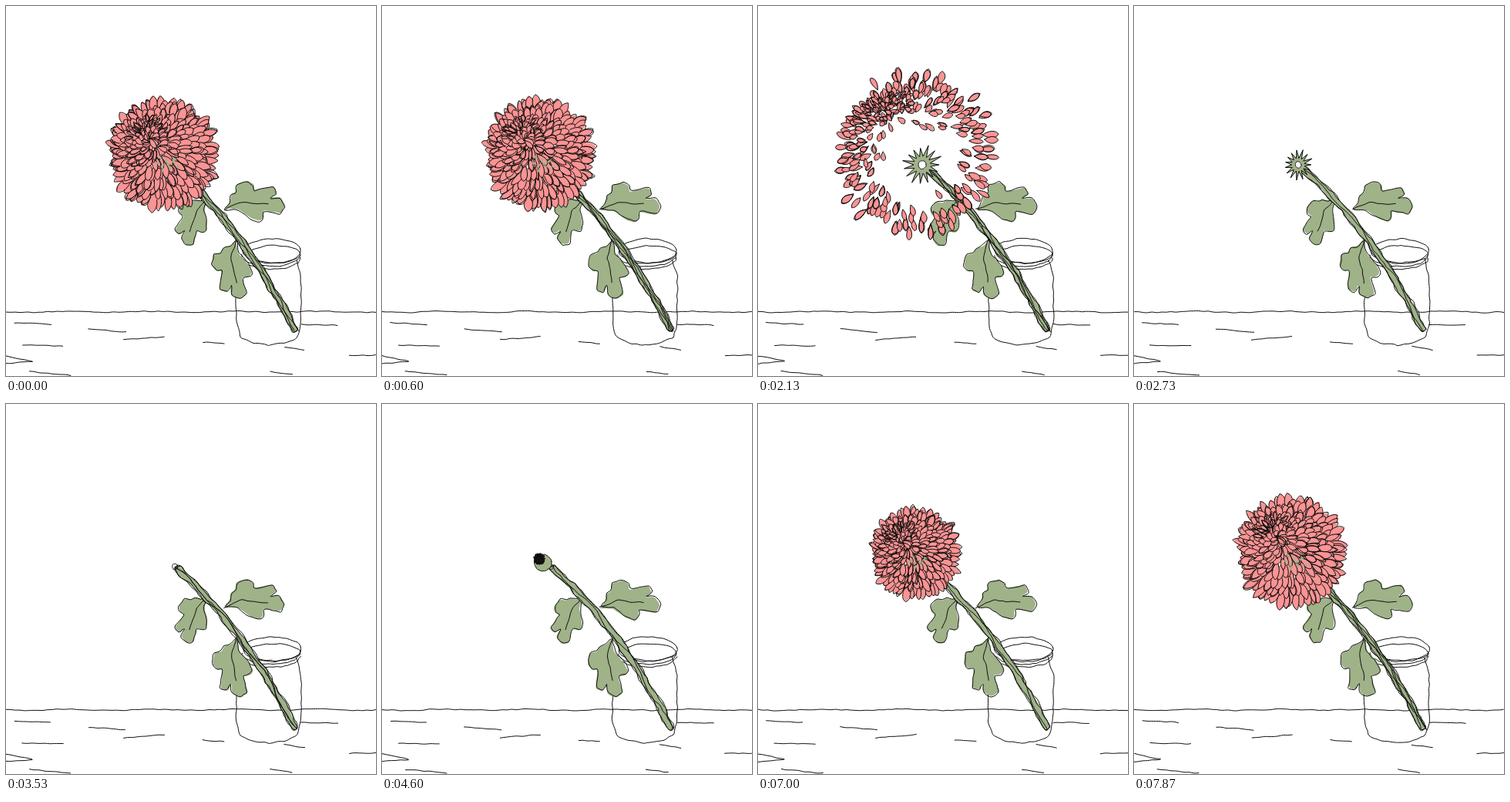
Animation of 480 by 480 pixels, one loop 7940 ms. Source, as an HTML page with a canvas:

```html
<!DOCTYPE html>
<html lang="en">
<head>
<meta charset="utf-8">
<title>Flower in a jar</title>
<style>
html, body { margin: 0; width: 100%; height: 100%; overflow: hidden; background: #fff; }
canvas { display: block; }
</style>
</head>
<body>
<canvas id="stage" width="480" height="480"></canvas>
<script>
const ctx = document.getElementById('stage').getContext('2d');
const LOOP = 7940, FRAMES = 119;
const GREEN = '#9fb288', PINK = '#fb9494', INK = '#0c0c0c';
const TAU = Math.PI * 2;
const BURST = 1450, BURST_LENGTH = 1150;
const HEART = { x: 207, y: 205 };

function seeded(seed) {
  let a = seed * 7919 + 17;
  return () => {
    a = (a + 0x6d2b79f5) | 0;
    let x = Math.imul(a ^ (a >>> 15), 1 | a);
    x = (x + Math.imul(x ^ (x >>> 7), 61 | x)) ^ x;
    return ((x ^ (x >>> 14)) >>> 0) / 4294967296;
  };
}

let rand = seeded(1);
const spread = amount => (rand() * 2 - 1) * amount;
const clamp = x => Math.min(1, Math.max(0, x));
const progress = (t, from, to) => clamp((t - from) / (to - from));
const smooth = x => x * x * (3 - 2 * x);
const range = (n, make) => Array.from({ length: n }, (_, i) => make(i));
const points = text => text.split(' ').map(p => p.split(',').map(Number));

// One lobed leaf, measured along and across its axis.
const leafShape = points('0,0 .1,.11 .12,.24 .2,.27 .21,.4 .4,.45 .5,.38 .49,.29 .82,.35 .87,.23 .75,.16 .92,.17 1,.03 .93,-.1 .64,-.04 .64,-.17 .58,-.22 .44,-.17 .22,-.01');
const veinShape = points('0,0 .3,.12 .5,.08 .72,.07');
const leaves = [placeLeaf(283, 264, 362, 262, 1), placeLeaf(262, 250, 235, 311, -1), placeLeaf(299, 303, 306, 380, -1)];

function placeLeaf(x, y, tipX, tipY, side) {
  const dx = tipX - x, dy = tipY - y;
  const place = ([u, v]) => [x + dx * u + dy * v * side, y + dy * u - dx * v * side];
  return { outline: leafShape.map(place), vein: veinShape.map(place) };
}

const stem = range(20, i => {
  const t = i / 19, bend = 2 * t * (1 - t), rest = (1 - t) * (1 - t);
  return [219 * rest + 306 * bend + 376 * t * t, 211 * rest + 285 * bend + 422 * t * t];
});

const jarSide = points('36,329 42,352 42,412 37,430 21,437 0,440');
const jar = [...jarSide.map(([x, y]) => [341 + x, y]), ...jarSide.map(([x, y]) => [341 - x, y]).reverse()];

const scratches = [
  '11,411 58,413', '21,440 74,441', '107,419 155,423', '153,433 205,429', '255,436 283,438', '30,474 84,479',
  '343,474 371,478', '361,442 387,446', '445,453 480,453', '383,413 430,414', '0,454 36,461 0,464'
].map(points);

const petals = makePetals();

function makePetals() {
  rand = seeded(5);
  const list = [], rings = 7;
  const add = (cx, cy, r, angle, length, width) => {
    const mid = r - length / 2;
    list.push({
      x: cx + Math.cos(angle) * mid, y: cy + Math.sin(angle) * mid,
      angle: angle + spread(.22), length, width, pace: 1 + spread(.24)
    });
  };
  for (let ring = 0; ring < rings; ring++) {
    const f = ring / (rings - 1), count = Math.round(56 - 42 * f);
    for (let i = 0; i < count; i++) {
      const angle = (i + ring / 2 + rand() * .7) / count * TAU;
      add(205 - 17 * f, 192.5 - 18 * f, (74 - 62 * f) * (.92 + rand() * .15), angle,
        28 - 15 * f + spread(3), 10 - 3.5 * f + spread(1.5));
    }
    if (ring === rings - 3) {
      range(50, () => add(182, 169, 15 + rand() * 14, Math.PI * (.95 + rand() * 1.1), 11, 4));
    }
  }
  return list;
}

// Splits long segments so that every stretch of a line can wobble.
function divide(path, closed, step = 6) {
  const out = [];
  const last = closed ? path.length : path.length - 1;
  for (let i = 0; i < last; i++) {
    const [x, y] = path[i], [u, v] = path[(i + 1) % path.length];
    const n = Math.max(1, Math.round(Math.hypot(u - x, v - y) / step));
    for (let k = 0; k < n; k++) out.push([x + (u - x) * k / n, y + (v - y) * k / n]);
  }
  if (!closed) out.push(path[last]);
  return out;
}

function trace(path, closed, wobble) {
  const p = divide(path, closed).map(([x, y]) => [x + spread(wobble), y + spread(wobble)]);
  const n = p.length;
  const middle = i => [(p[i][0] + p[(i + 1) % n][0]) / 2, (p[i][1] + p[(i + 1) % n][1]) / 2];
  ctx.beginPath();
  if (closed) ctx.moveTo(...middle(n - 1));
  else ctx.moveTo(...p[0]);
  for (let i = closed ? 0 : 1; i < (closed ? n : n - 1); i++) ctx.quadraticCurveTo(...p[i], ...middle(i));
  if (!closed) ctx.lineTo(...p[n - 1]);
}

function sketch(path, closed = false, wobble = 1) {
  trace(path, closed, wobble);
  ctx.stroke();
}

function paint(path, color) {
  trace(path, true, .3);
  ctx.fillStyle = color;
  ctx.fill();
}

function ellipse(x, y, rx, ry, share = 1) {
  return range(24, i => {
    const a = TAU * share * i / (share < 1 ? 23 : 24);
    return [x + Math.cos(a) * rx, y + Math.sin(a) * ry];
  });
}

function drawTable() {
  sketch(range(41, i => [i * 12, 396.7 + Math.sin(i * .7) * .8]), false, .8);
  scratches.forEach(line => sketch(line, false, .7));
}

function drawJar() {
  sketch(jar.slice(0, -1), false, 1.1);
  sketch(ellipse(345, 318, 38, 16), true, 1.1);
  sketch(ellipse(347, 322, 35, 11), true, 1.1);
  for (const y of [323, 327]) sketch(ellipse(344, y, 38, 14.5, .5));
}

function drawStem() {
  const edge = side => stem.map(([x, y], i) => {
    const half = (4.2 + Math.sin(i * 1.9 + side)) * side;
    return [x + half * .85, y - half * .53];
  });
  const outline = [...edge(1), ...edge(-1).reverse()];
  paint(outline, GREEN);
  range(2, () => sketch(outline, true, 1.7));
  range(1 + Math.floor(rand() * 3), () => {
    const phase = rand() * TAU;
    sketch(stem.map(([x, y], i) => [x + Math.sin(i + phase) * 3, y]), false, 1.2);
  });
  sketch(ellipse(...stem[0], 3.5, 4), true, .7);
}

function drawLeaves() {
  for (const { outline, vein } of leaves) {
    const dx = spread(1.2), dy = spread(1.2);
    paint(outline.map(([x, y]) => [x + dx, y + dy]), GREEN);
    sketch(outline, true, 1.2);
    sketch(vein);
  }
}

function drawCalyx(scale, open) {
  if (scale < .03) return;
  const spikes = 15, cx = 213, cy = 206;
  ctx.beginPath();
  for (let i = 0; i < spikes * 2; i++) {
    const r = (i % 2 ? 11 : 24 + spread(3)) * scale, a = i / spikes / 2 * TAU;
    ctx.lineTo(cx + Math.cos(a) * r, cy + Math.sin(a) * r);
  }
  ctx.closePath();
  ctx.fillStyle = GREEN;
  ctx.fill();
  ctx.stroke();
  if (!open) return;
  const hole = ellipse(cx, cy, 5 * scale, 5.5 * scale);
  paint(hole, '#fff');
  sketch(hole, true, .5);
}

function drawPetal(x, y, angle, length, width, wobble) {
  const c = Math.cos(angle), s = Math.sin(angle);
  const shape = loose => {
    const at = (u, v) => [
      x + c * u * length - s * v * width + spread(loose),
      y + s * u * length + c * v * width + spread(loose)
    ];
    const base = at(-.5, 0), tip = at(.5, 0);
    ctx.beginPath();
    ctx.moveTo(...base);
    ctx.bezierCurveTo(...at(-.1, -.65), ...at(.35, -.65), ...tip);
    ctx.bezierCurveTo(...at(.35, .65), ...at(-.1, .65), ...base);
  };
  shape(0);
  ctx.fillStyle = PINK;
  ctx.fill();
  shape(wobble);
  ctx.stroke();
  if (rand() < .35) {
    shape(wobble * 1.4);
    ctx.stroke();
  }
}

function drawBloom(scale) {
  const x = HEART.x - 3 * (1 - scale), y = HEART.y - 3 * (1 - scale);
  for (const p of petals) {
    drawPetal(x + (p.x - HEART.x) * scale, y + (p.y - HEART.y) * scale, p.angle,
      p.length * scale, p.width * scale, .8 + .9 * scale);
  }
  ctx.fillStyle = GREEN;
  for (let i = 0; scale > .3 && i < 9; i++) {
    const a = i * 2.4, r = (4 + i * 1.6) * scale;
    ctx.beginPath();
    ctx.ellipse(HEART.x + Math.cos(a) * r, HEART.y + Math.sin(a) * r * .6, 3 * scale, 1.4 * scale, a, 0, TAU);
    ctx.fill();
  }
}

function drawBurst(t) {
  const age = t - BURST;
  const size = 1 - Math.pow(clamp(age / BURST_LENGTH), 1.7);
  if (size < .01) return;
  const push = 9e-5 * age * age;
  for (const p of petals) {
    const dx = p.x - HEART.x, dy = p.y - HEART.y, r = Math.hypot(dx, dy) || 1;
    const away = push * p.pace * (1 + .35 * clamp(1 - r / 65)) / r;
    drawPetal(p.x + dx * away, p.y + dy * away, p.angle,
      p.length * size, p.width * Math.pow(size, .6), 1.7 * size);
  }
}

function drawBud(t) {
  const ball = 11 * smooth(progress(t, 4050, 4500));
  if (ball < .5) return;
  const globe = ellipse(209, 206, ball, ball);
  paint(globe, GREEN);
  sketch(globe, true, .8);
  const bloom = smooth(progress(t, 6200, 7250)), peek = progress(t, 5000, 6000);
  const seed = .11 * progress(t, 4150, 4600) + .02 * peek;
  const scale = seed + (1 - seed) * bloom;
  if (bloom) drawCalyx(scale, false);
  if (scale > .01) drawBloom(scale);
  if (!peek || scale > .3) return;
  for (let i = -1; i < 2; i++) {
    drawPetal(203 + i * 4, 202, -1.75 + i * .15, 12 * peek, 4.5 * peek, .6);
    sketch([[211 + i * 3, 214 - i * 2], [210 + i * 4, 205 - i * 2]], false, .8);
  }
}

function drawFlower(t) {
  if (t >= 4000) return drawBud(t);
  drawCalyx(1 - smooth(progress(t, 2450, 3150)), true);
  if (t < BURST) drawBloom(1);
  else drawBurst(t);
}

function draw(frame) {
  rand = seeded(frame + 100);
  ctx.fillStyle = '#fff';
  ctx.fillRect(0, 0, 480, 480);
  ctx.strokeStyle = INK;
  ctx.lineWidth = 1;
  ctx.lineJoin = ctx.lineCap = 'round';
  drawTable();
  drawJar();
  drawLeaves();
  drawStem();
  drawFlower(frame * LOOP / FRAMES);
}

const start = performance.now();
let shown = -1;
function tick() {
  const t = (performance.now() - start) % LOOP;
  const frame = Math.floor(t / LOOP * FRAMES);
  if (frame !== shown) draw(shown = frame);
  requestAnimationFrame(tick);
}
tick();
</script>
</body>
</html>
```
